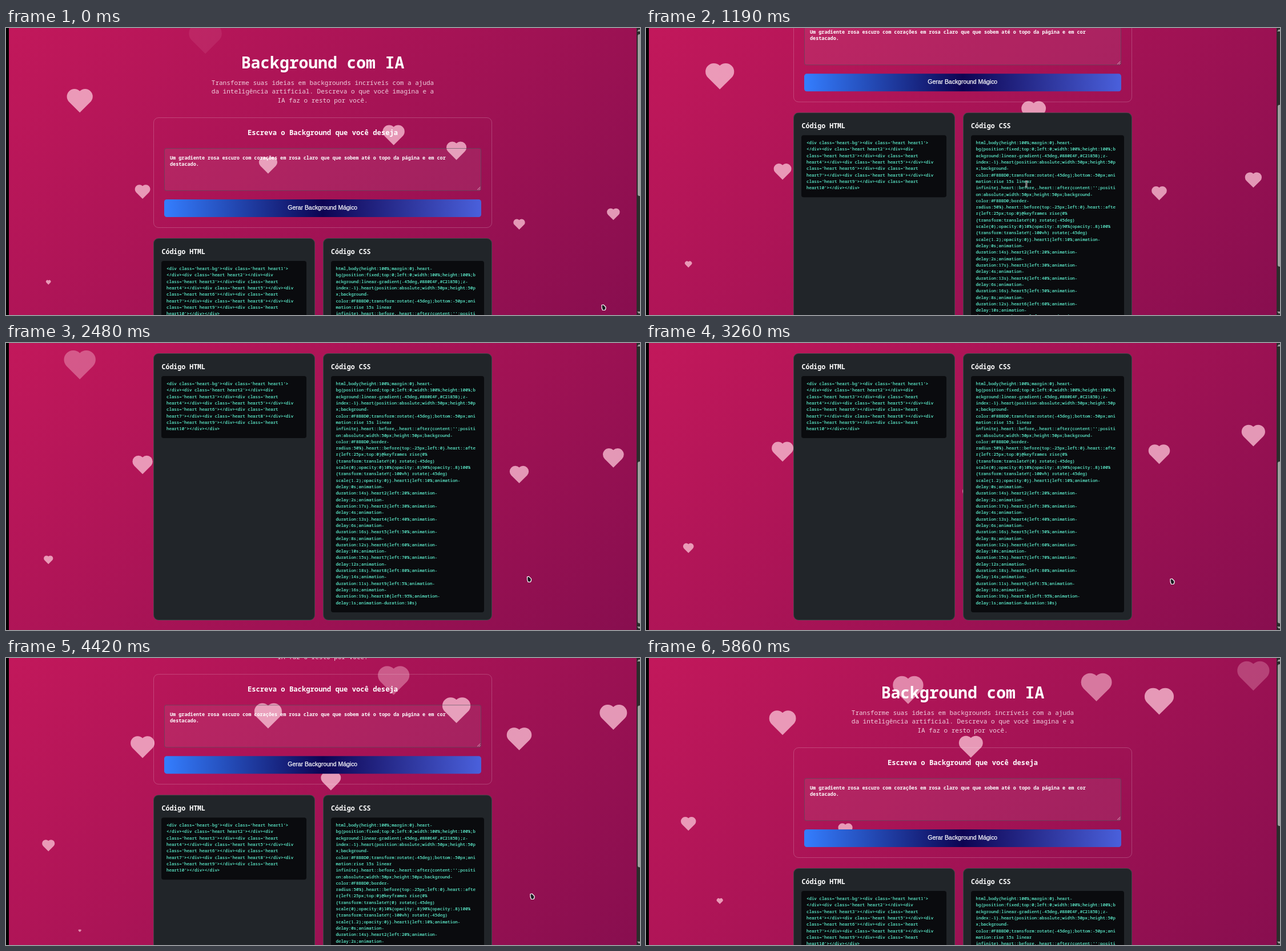
Animation, 1110 px wide and 504 px high, one loop 5.93 s. Source, as an HTML page:

```html
<!DOCTYPE html>
<html lang="pt-BR">
<head>
<meta charset="utf-8">
<title>Background com IA</title>
<style>
html, body { margin: 0; width: 100%; height: 100%; overflow: hidden; background: #000; }
body { position: relative; font-family: "Noto Sans Mono", monospace; color: #fff; }
div, pre, svg { position: absolute; box-sizing: border-box; margin: 0; }
#sky { left: 5px; top: 0; width: 1099px; height: 508px; background: linear-gradient(-45deg, #880e4f, #c2185b); }
#hearts { left: 0; top: 0; width: 1104px; height: 504px; fill: #f8bbd0; }
#page { left: 0; top: 0; width: 1104px; height: 860px; }
.mid { left: 258px; width: 593px; text-align: center; white-space: pre; }
h1, h2, h3, p { position: absolute; margin: 0; white-space: pre; }
h1 { top: 40px; font: 700 28px/40px "Noto Sans Mono", monospace; }
p { top: 87.5px; font-size: 11px; line-height: 15.5px; color: rgba(255,255,255,.8); }
h2 { top: 174px; font-size: 12.2px; line-height: 20px; }
h3 { left: 13.5px; top: 12.5px; font-size: 11.6px; line-height: 20px; }
#form { left: 258px; top: 156.5px; width: 592.5px; height: 194px; border: 1px solid rgba(255,255,255,.2); border-radius: 9px; }
#area { left: 277px; top: 211px; width: 554.5px; height: 75px; padding: 9.5px 9px; border: 1px solid rgba(73,80,87,.6);
  border-radius: 4px; background: rgba(255,255,255,.07); white-space: pre; font-size: 8.475px; line-height: 11px; font-weight: 600; }
#grip { left: 825px; top: 279px; width: 6px; height: 6px; }
#go { left: 277px; top: 300.5px; width: 554.5px; height: 31px; border-radius: 4.5px; text-align: center;
  font: 10.45px/30px "Liberation Sans", Arial, sans-serif; -webkit-text-stroke: .25px;
  background: linear-gradient(90deg, #347eff, #0d0452 50%, #4a60dc); }
.card { top: 369px; height: 469px; background: #212529; border: 1px solid rgba(255,255,255,.15); border-radius: 9px; }
pre { left: 13px; top: 38.5px; padding: 8.5px 9px; border-radius: 4px; background: #0a0b0e; color: #64ffda;
  font: 500 7.41px/11.32px "Noto Sans Mono", monospace; -webkit-text-stroke: .15px; }
#bar { left: 1104px; top: 0; width: 6px; height: 504px; background: #2c2c2c; }
#thumb { left: 2px; top: 11px; width: 7px; height: 284px; border-radius: 3px; background: #9f9f9f; }
#bar svg { left: 0; top: 0; }
#arrow, #beam { left: 0; top: 0; width: 12px; height: 14px; overflow: visible; }
</style>
</head>
<body>
<div id="sky"></div>
<svg id="hearts"></svg>
<div id="page">
  <h1 class="mid">Background com IA</h1>
  <p class="mid">Transforme suas ideias em backgrounds incríveis com a ajuda
da inteligência artificial. Descreva o que você imagina e a
IA faz o resto por você.</p>
  <div id="form"></div>
  <h2 class="mid">Escreva o Background que você deseja</h2>
  <div id="area">Um gradiente rosa escuro com corações em rosa claro que que sobem até o topo da página e em cor
destacado.</div>
  <svg id="grip"><path d="M0 5.5L5.5 0M3 5.5L5.5 3" stroke="#e6d5de" stroke-width=".8"/></svg>
  <div id="go">Gerar Background Mágico</div>
  <div class="card" style="left:258px;width:282.5px">
    <h3>Código HTML</h3><pre id="html" style="width:254px;height:109.5px"></pre>
  </div>
  <div class="card" style="left:554.5px;width:296px">
    <h3>Código CSS</h3><pre id="css" style="width:268px;height:415px"></pre>
  </div>
</div>
<div id="bar"><div id="thumb"></div>
  <svg width="6" height="504" fill="#9f9f9f"><path d="M1 6L4.5 2L8 6ZM1 498L4.5 502L8 498Z"/></svg>
</div>
<svg id="arrow"><path d="M-3 -4.5L0 -5L4 -1Q4.5 3 2.5 4.5L-1.5 4.5Q-3.5 1 -3 -4.5Z" fill="#1c1c22" stroke="#fff" stroke-width="1.2" stroke-linejoin="round"/></svg>
<svg id="beam"><rect x="-1" y="-5.5" width="2" height="11" fill="#333" stroke="#ddd" stroke-width=".8"/></svg>
<script>
const $ = id => document.getElementById(id);
const LOOP = 5930;

// each heart: left %, delay s, duration s
const hearts = [[10, 0, 14], [20, 2, 17], [30, 4, 13], [40, 6, 16], [50, 8, 12],
  [60, 10, 15], [70, 12, 18], [80, 14, 11], [5, 16, 19], [95, 1, 10]];

$('html').textContent = `<div class='heart-bg'><div class='heart heart1'>
</div><div class='heart heart2'></div><div
class='heart heart3'></div><div class='heart
heart4'></div><div class='heart heart5'></div><div
class='heart heart6'></div><div class='heart
heart7'></div><div class='heart heart8'></div><div
class='heart heart9'></div><div class='heart
heart10'></div></div>`;

const rules = hearts.map(([left, delay, dur], i) =>
  `.heart${i + 1}{left:${left}%;animation-\ndelay:${delay}s;animation-${i < 9 ? '\n' : ''}duration:${dur}s}`);
$('css').textContent = `html,body{height:100%;margin:0}.heart-
bg{position:fixed;top:0;left:0;width:100%;height:100%;b
ackground:linear-gradient(-45deg,#880E4F,#C2185B);z-
index:-1}.heart{position:absolute;width:50px;height:50p
x;background-
color:#F8BBD0;transform:rotate(-45deg);bottom:-50px;ani
mation:rise 15s linear
infinite}.heart::before,.heart::after{content:'';positi
on:absolute;width:50px;height:50px;background-
color:#F8BBD0;border-
radius:50%}.heart::before{top:-25px;left:0}.heart::afte
r{left:25px;top:0}@keyframes rise{0%
{transform:translateY(0) rotate(-45deg)
scale(0);opacity:0}10%{opacity:.8}90%{opacity:.8}100%
{transform:translateY(-100vh) rotate(-45deg)
scale(1.2);opacity:0}}` + rules.join('');

const shapes = hearts.map(() => {
  const el = document.createElementNS('http://www.w3.org/2000/svg', 'path');
  el.setAttribute('d', 'M0 20.25L-20.25 0A14.32 14.32 0 0 1 0 -20.25A14.32 14.32 0 0 1 20.25 0Z');
  return $('hearts').appendChild(el);
});

// monotone cubic through [time, value] keys
function track(keys) {
  const slope = i => (keys[i + 1][1] - keys[i][1]) / (keys[i + 1][0] - keys[i][0]);
  const tangent = i => {
    if (i === 0 || i === keys.length - 1) return 0;
    const a = slope(i - 1), b = slope(i);
    return a * b > 0 ? 2 * a * b / (a + b) : 0;
  };
  return t => {
    let i = 0;
    while (i < keys.length - 2 && t > keys[i + 1][0]) i++;
    const [t0, a] = keys[i], [t1, b] = keys[i + 1], d = t1 - t0;
    const u = Math.min(1, Math.max(0, (t - t0) / d)), v = 1 - u;
    return a * v * v * (1 + 2 * u) + b * u * u * (3 - 2 * u) + d * u * v * (tangent(i) * v - tangent(i + 1) * u);
  };
}
const scroll = track([[0, 0], [380, 0], [660, 69], [1190, 220.5], [1930, 303], [2450, 351], [3270, 351], [4420, 129], [5620, 0]]);
const cursorX = track([[0, 1046], [480, 666], [1400, 666], [1930, 877], [2750, 921], [5100, 921], [5700, 1125]]);
const cursorY = track([[0, 491], [480, 274], [1400, 274], [1930, 389], [2750, 419], [5100, 419], [5700, 495]]);

function draw(t) {
  const clock = 94.84 + t * .000988;
  hearts.forEach(([left, delay, dur], i) => {
    const p = (clock - delay) % dur / dur;
    shapes[i].setAttribute('transform', `translate(${19.3 + left * 10.99} ${523 - 508 * p}) scale(${1.2 * p})`);
    shapes[i].setAttribute('opacity', .8 * Math.min(1, p * 10, (1 - p) * 10));
  });
  const y = scroll(t);
  $('page').style.transform = `translateY(${-y}px)`;
  $('thumb').style.transform = `translateY(${y * .562}px)`;
  const typing = t > 400 && t < 1450;
  for (const id of ['arrow', 'beam']) {
    $(id).style.transform = `translate(${cursorX(t)}px, ${cursorY(t)}px)`;
    $(id).style.display = typing === (id === 'beam') ? '' : 'none';
  }
}

const start = performance.now();
function tick() {
  draw((performance.now() - start) % LOOP);
  requestAnimationFrame(tick);
}
tick();
</script>
</body>
</html>
```
